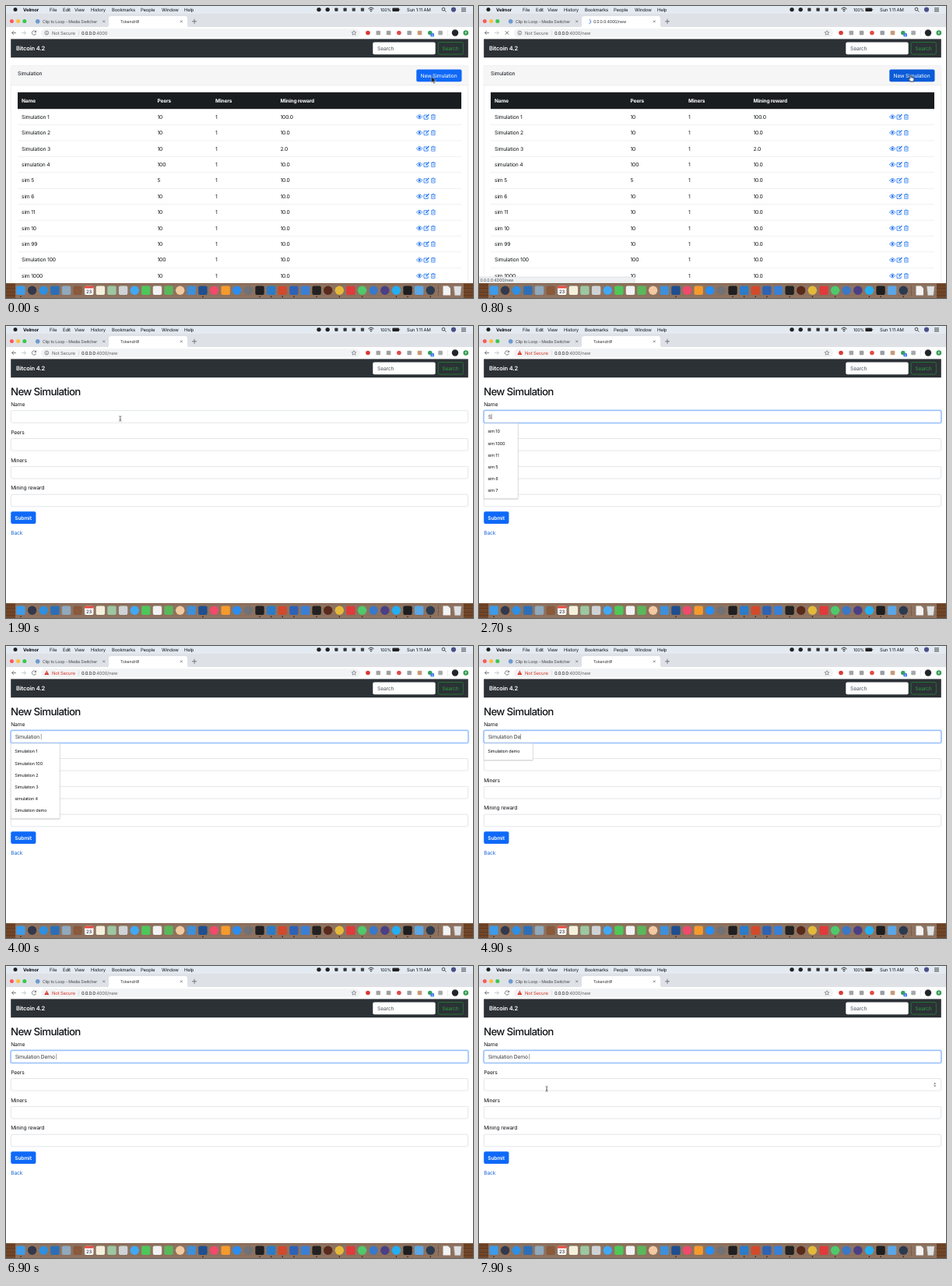
Animation of 600 by 375 pixels, one loop 8 s. Source, as an HTML page:

```html
<!DOCTYPE html>
<html lang="en">
<head>
<meta charset="utf-8">
<title>New simulation</title>
<style>
html, body { margin: 0; width: 100%; height: 100%; overflow: hidden; background: #fff; }
svg { display: block; width: 100vw; height: 100vh; }
text {
  font: 6.7px Inter, "Open Sans", sans-serif; letter-spacing: -.15px; fill: #101316;
  white-space: pre; text-rendering: geometricPrecision;
}
.list, .form, .idle, .load, .tail, .hover, .status, .focus, .spin, .safe, .warn, .red, .arrow, .hand, .beam, .pointer {
  animation: 8s step-end infinite;
}
.list { animation-name: list; }
.form { animation-name: form; }
.idle { animation-name: idle; }
.load { animation-name: load; }
.tail { animation-name: tail; }
.hover { animation-name: hover; }
.status { animation-name: status; }
.focus { animation-name: focus; }
.spin { animation-name: spin; }
.safe { animation-name: safe; }
.warn { animation-name: warn; }
.red { animation-name: red; }
.arrow { animation-name: arrow; }
.hand { animation-name: hand; }
.beam { animation-name: beam; }
.pointer { animation-name: move; animation-timing-function: ease-in-out; }
.turn { transform-origin: 141px 20px; animation: turn 1s linear infinite; }
@keyframes list { 0% { visibility: visible } 13%, 100% { visibility: hidden } }
@keyframes form { 0% { visibility: hidden } 13%, 100% { visibility: visible } }
@keyframes idle { 0% { visibility: visible } 7% { visibility: hidden } 13%, 100% { visibility: visible } }
@keyframes load { 0% { visibility: hidden } 7% { visibility: visible } 13%, 100% { visibility: hidden } }
@keyframes tail { 0% { visibility: hidden } 7%, 100% { visibility: visible } }
@keyframes hover { 0% { fill: #0f69f7 } 4%, 100% { fill: #0b5cd8 } }
@keyframes status { 0% { visibility: hidden } 5% { visibility: visible } 13%, 100% { visibility: hidden } }
@keyframes focus { 0% { visibility: hidden } 27.5%, 100% { visibility: visible } }
@keyframes spin { 0% { visibility: hidden } 95.5%, 100% { visibility: visible } }
@keyframes safe { 0% { visibility: visible } 32.5%, 100% { visibility: hidden } }
@keyframes warn { 0% { visibility: hidden } 32.5%, 100% { visibility: visible } }
@keyframes red { 0% { fill: #5f6368 } 32.5%, 100% { fill: #d93025 } }
@keyframes arrow { 0% { visibility: visible } 4% { visibility: hidden } 13% { visibility: visible } 21%, 100% { visibility: hidden } }
@keyframes hand { 0% { visibility: hidden } 4% { visibility: visible } 13%, 100% { visibility: hidden } }
@keyframes beam { 0% { visibility: hidden } 21% { visibility: visible } 32.5% { visibility: hidden } 91%, 100% { visibility: visible } }
@keyframes move {
  0% { transform: translate(546.5px, 90.5px) }
  6%, 13% { transform: translate(554.5px, 88.5px) }
  22.5%, 91% { transform: translate(146.7px, 119px) }
  98%, 100% { transform: translate(87px, 157.8px) }
}
@keyframes turn { to { transform: rotate(360deg) } }
</style>
</head>
<body>
<svg id="stage" viewBox="0 0 600 375"></svg>
<script>
const rect = (x, y, w, h, fill, more = '') =>
  `<rect x="${x}" y="${y}" width="${w}" height="${h}" fill="${fill}" ${more}/>`;
const dot = (x, y, r, fill, more = '') => `<circle cx="${x}" cy="${y}" r="${r}" fill="${fill}" ${more}/>`;
const line = (d, color, w = .8, more = '') =>
  `<path d="${d}" fill="none" stroke="${color}" stroke-width="${w}" ${more}/>`;
const group = (name, body) => `<g class="${name}">${body}</g>`;
// y is the middle of the capitals
const text = (x, y, s, css = '', size = 6.7, name = '') =>
  `<text x="${x}" y="${y + size * .36}" class="${name}" style="font-size:${size}px;${css}">${s}</text>`;
const cross = (x, y, r, color, w) => line(`M${x - r} ${y - r}l${2 * r} ${2 * r}m0 ${-2 * r}l${-2 * r} ${2 * r}`, color, w);
const shape = (code, x, y, r) => code[0] === 'c'
  ? dot(x, y, r, '#' + code.slice(1))
  : rect(x - r, y - r, 2 * r, 2 * r, '#' + code.slice(1), `rx="${r * .35}"`);

function menuBar() {
  const menus = [[56, 'File'], [73, 'Edit'], [88, 'View'], [109, 'History'], [136, 'Bookmarks'],
    [173, 'People'], [200, 'Window'], [229, 'Help']];
  const marks = ['c222', 'c222', 's333', 's333', 's444', 's444'];
  return rect(0, 0, 600, 9.3, '#e3eaf2') + dot(12, 4.5, 2.5, '#222') +
    text(22, 4.6, 'Velmor', 'font-weight:700', 6) +
    menus.map(([x, s]) => text(x, 4.6, s, '', 5.9)).join('') +
    marks.map((m, i) => shape(m, 402 + i * 11.2, 4.6, m[0] === 'c' ? 2.7 : 2.1)).join('') +
    line('M465.5 3.800q3.5-3.4 7 0M467 5.200q2-2 4 0', '#222', 1) + dot(469, 6.6, .8, '#222') +
    text(481, 4.6, '100%', '', 5.4) +
    rect(496.4, 2.4, 8.6, 4.6, '#222', 'rx="1"') + rect(505.4, 3.8, .8, 1.8, '#222') +
    text(515, 4.6, 'Sun 1:11 AM', '', 5.9) +
    dot(562, 4.1, 1.9, 'none', 'stroke="#222" stroke-width=".8"') + line('M563.4 5.5l2 2', '#222') +
    dot(575, 4.6, 3.1, '#4a4f86') + line('M585 2.800h6m-6 2h6m-6 2h6', '#222');
}

function browser() {
  const grey = '#5f6368';
  const marks = ['cd93a3a', 'sa4a4a4', 'sa0a0a0', 'cdf4b45', 's9aa0a6', 'sc99a78', 'c35a05a', 'sa6a8ab'];
  return rect(0, 9.3, 600, 18.2, '#dee1e6') +
    ['#fc5b57', '#fdbc40', '#34c84a'].map((c, i) => dot(7.4 + i * 8.2, 19.6, 2.5, c)).join('') +
    dot(40.7, 19.8, 2.8, '#6b9bd0') + text(47, 19.8, 'Clip to Loop - Media Switcher', 'fill:#45484c', 5.3) +
    cross(125.7, 19.8, 1.4, grey, .7) +
    '<path d="M129 27.5q3 0 3-3v-8.500q0-3 3-3h95q3 0 3 3v8.500q0 3 3 3z" fill="#fff"/>' +
    group('idle', text(147, 19.8, 'Tokendrill!', 'fill:#303337', 5.3)) +
    group('load', text(147, 19.8, '0.0.0.0:4000/new', 'fill:#303337', 5.3) +
      dot(141, 20, 2.6, 'none', 'class="turn" stroke="#3367d6" stroke-width=".9" stroke-dasharray="7 10"')) +
    cross(225.3, 19.8, 1.4, grey, .7) + line('M239 19.8h6m-3-3v6', grey) +
    rect(0, 27, 600, 15.3, '#fff') +
    line('M13 34.5H7.500m2.500-2.500l-2.500 2.500l2.500 2.500', grey) +
    line('M20 34.5h5.500m-2.500-2.500l2.500 2.500l-2.500 2.500', '#bcbfc3') +
    group('idle', line('M38.300 33a2.700 2.700 0 1 0 .3 2.300m0-3.800v2h-2', grey)) +
    group('load', cross(36, 34.5, 2.2, grey, .9)) +
    rect(45, 29, 410, 11, '#f1f3f4', 'rx="5.5"') +
    group('safe', dot(52.3, 34.5, 2.4, 'none', `stroke="${grey}" stroke-width=".7"`) + line('M52.300 34v2m0-3.200v.6', grey, .7)) +
    group('warn', '<path d="M52.300 31.600l3 5.400h-6z" fill="#d93025"/>' + line('M52.300 33.400v1.600m0 .5v.7', '#fff', .6)) +
    text(59, 34.5, 'Not Secure', '', 5.9, 'red') + rect(93, 31.5, .5, 6, '#c4c7cb') +
    text(97, 34.5, `0.0.0.0<tspan style="fill:${grey}">:4000<tspan class="tail">/new</tspan></tspan>`, '', 5.8) +
    line('M447 31.600l.9 2h2.100l-1.600 1.400l.6 2.200l-2-1.300l-2 1.300l.6-2.200l-1.600-1.400h2.100z', grey, .6) +
    marks.map((m, i) => shape(m, 465 + i * 13.3, 34.5, 2.8)).join('') +
    rect(545.4, 35, 4.6, 4.4, '#3b78e7', 'rx="1"') + text(546.6, 37.3, '2', 'fill:#fff', 3.8) +
    rect(567, 30.5, .5, 8, '#d4d6d9') +
    dot(577, 34.5, 4.2, '#22252a') + dot(590.8, 34.5, 3.3, '#2d9a4b') +
    line('M590.800 36.200v-3m-1.300 1.200l1.300-1.300l1.300 1.300', '#fff', .7);
}

function navBar() {
  return rect(6.2, 42.4, 587.6, 23.8, '#2c3136') + text(13, 54.3, 'Bitcoin 4.2', 'fill:#fff;font-weight:600', 7.5) +
    rect(471.3, 46.4, 80.4, 15.8, '#fff', 'rx="2"') + text(477, 54.4, 'Search', 'fill:#4b5157') +
    rect(555.2, 46.6, 32.2, 15.4, 'none', 'rx="2" stroke="#218a35" stroke-width=".7"') +
    text(560.3, 54.4, 'Search', 'fill:#2a9d3e');
}

function rowIcons(y) {
  const blue = '#1a6ff0';
  return line(`M527.500 ${y}q3.700-5 7.400 0q-3.700 5-7.400 0z`, blue) + dot(531.2, y, 1.4, blue) +
    line(`M541 ${y - 2.2}h-4v5.200h5.200v-2.600`, blue) + line(`M539.400 ${y + .9}l4-4`, blue, 1.3) +
    line(`M546 ${y - 2}h5.800m-4-.1v-.9h2.200v.9m-3.300.1v5.100h4.400v-5.100m-3.100 1.400v2.400m1.800-2.400v2.400`, blue, .65);
}

function listPage() {
  const cols = [20, 194.5, 269, 352.5];
  const rows = [['Simulation 1', 10, '100.0'], ['Simulation 2'], ['Simulation 3', 10, '2.0'], ['simulation 4', 100],
    ['sim 5', 5], ['sim 6'], ['sim 11'], ['sim 10'], ['sim 99'], ['Simulation 100', 100], ['sim 1000']];
  const body = rows.map(([name, peers = 10, reward = '10.0'], i) => {
    const y = 142.3 + i * 20.42;
    return [name, peers, 1, reward].map((s, c) => text(cols[c], y, s)).join('') +
      rowIcons(y) + rect(15, y + 10, 570, .5, '#dee2e6');
  }).join('');
  const heads = ['Name', 'Peers', 'Miners', 'Mining reward'];
  return rect(6.2, 76.4, 587.6, 300, '#fff', 'rx="2" stroke="#dcdcdc" stroke-width=".5"') +
    rect(6.4, 76.6, 587.2, 25, '#f6f6f7') + rect(6, 101.6, 588, .5, '#dcdcdc') +
    text(15, 86.5, 'Simulation') +
    rect(527.3, 81.5, 58.2, 15.8, '#0f69f7', 'rx="2" class="hover"') + text(532.5, 89.5, 'New Simulation', 'fill:#fff') +
    rect(15, 110.8, 570, 21.4, '#1a1d20') +
    heads.map((s, i) => text(cols[i], 121.6, s, 'fill:#fff;font-weight:700', 6.5)).join('') + body +
    group('status', '<path d="M0 348h198q2 0 2 2v6H0z" fill="#eef0f1" stroke="#c9cccf" stroke-width=".5"/>' +
      text(1.5, 352.2, '0.0.0.0:4000/new', 'fill:#4d5156', 5.4));
}

function formPage() {
  const fields = ['Name', 'Peers', 'Miners', 'Mining reward'].map((s, i) => {
    const y = 100.4 + i * 35.85;
    return text(6.2, y, s) + rect(6.3, y + 8.3, 587.4, 15.6, '#fff', 'rx="2" stroke="#ced4da" stroke-width=".6"');
  }).join('');
  return text(6, 84.3, 'New Simulation', 'font-weight:550;letter-spacing:-.65px', 13.3) + fields +
    group('spin', '<path d="M584 151.800l1.700-2.300l1.700 2.300zM584 153.300l1.700 2.300l1.700-2.300z" fill="#8a8d90"/>') +
    rect(6.2, 238.2, 32.2, 15.8, '#0f69f7', 'rx="2"') + text(11.3, 246.2, 'Submit', 'fill:#fff;font-weight:600', 6.6) +
    text(6.2, 266, 'Back', 'fill:#1a66d8');
}

function focusRing() {
  return rect(5.7, 108, 588.6, 16.8, 'none', 'rx="2.4" stroke="#bcd8ff" stroke-width="1.6"') +
    rect(6.3, 108.7, 587.4, 15.6, '#fff', 'rx="2" stroke="#6ea8f7" stroke-width=".7"');
}

function dock() {
  const icons = ('s3d9be9 c34384a c2f8fe0 s2c6fb8 s8fa9bd s8a5a3c sffffff sf5f0dc s9cc7a0 scfd3d6 c3fa9f5 s4fc65a ' +
    'sf2f2f2 s5bb75b cf2c9a0 s3f8fd8 s1f4f8f cf04a6a sf59a2c c2b8df0 c6f7276 s1f1f22 s2b7cc9 sd24a2c s2f62b5 ' +
    's3b7fd4 s222222 c5a2a1c ce4b93a sdf3b3b c4fc96b c3a78c9 c4b3f86 c25aef0 s1d1d1f s5aa6e6 c2b3a4f').split(' ');
  const at = i => 19 + i * 14.62;
  const grain = [358.5, 362, 367, 371].map(y => rect(0, y, 600, .8, '#5a3620')).join('');
  return rect(0, 356, 600, 19, '#714629') + grain + rect(12, 356.5, 576, 19, '#a08c7e', 'opacity=".65"') +
    icons.map((c, i) => shape(c, at(i), 365.3, 5.7)).join('') +
    rect(at(6) - 5.7, 359.6, 11.4, 3, '#e5493f', 'rx="1"') + text(at(6) - 3.6, 367, '23', '', 6) +
    [0, 16, 21, 22, 23, 24, 26, 28, 30, 33, 34, 36].map(i => dot(at(i), 373.2, .8, '#24140b')).join('') +
    rect(555, 359, .5, 13, '#5f422f') +
    '<path d="M561.500 359.500h6.500l3 3v9h-9.500z" fill="#f4f4f4"/>' +
    '<path d="M575.500 360h9.500l-1.200 11.500h-7.100z" fill="#dfe2e4" stroke="#b9bdc1" stroke-width=".5"/>';
}

function pointer() {
  return group('pointer',
    group('arrow', '<path d="M0 0v8l1.900-1.700l1.300 2.900l1.400-.6l-1.300-2.800h2.500z" fill="#111" stroke="#fff" stroke-width=".5"/>') +
    group('hand', '<path d="M-.8.8q.8-1.300 1.600 0v2.400l3 .7q.8.300.6 1.300l-.7 3.300h-4l-2.400-3.300q.2-1.200 1.900-.2z" fill="#fff" stroke="#111" stroke-width=".7"/>') +
    group('beam', line('M-1.500-3.200q1.500 0 1.500.9v4.600q0 .9-1.500.9M1.500-3.200q-1.500 0-1.500.9m0 4.600q0 .9 1.500.9M-.8.800h1.600', '#333', .7)));
}

document.getElementById('stage').innerHTML = rect(0, 0, 600, 375, '#fff') +
  group('list', listPage()) + group('form', formPage()) + group('focus', focusRing()) +
  '<g id="entry"></g>' + menuBar() + browser() + navBar() + dock() + pointer();

const entry = document.getElementById('entry');
const phrase = 'Simulation Demo ';
const past = ['sim 10', 'sim 1000', 'sim 11', 'sim 5', 'sim 6', 'sim 7', 'Simulation 1', 'Simulation 100',
  'Simulation 2', 'Simulation 3', 'simulation 4', 'Simulation demo'];
const keyTime = i => i < 1 ? 2600 : i < 11 ? 2680 + 120 * i : 4500 + 250 * (i - 11);

// Measured large and scaled down, to keep fractions of a pixel
const pen = document.createElement('canvas').getContext('2d');
pen.font = '100px Inter, "Open Sans", sans-serif';
const width = (s, size) => pen.measureText(s).width * size / 100 - .15 * s.length;

function menu(typed) {
  const hits = typed ? past.filter(s => s.toLowerCase().startsWith(typed.toLowerCase())).slice(0, 6) : [];
  if (!hits.length) return '';
  const w = 22 + Math.max(...hits.map(s => width(s, 5.5)));
  const h = hits.length * 15.05 + 6.5;
  return rect(5.8, 125.4, w + .8, h + .8, '#000', 'rx="1.5" opacity=".12"') +
    rect(6.2, 125, w, h, '#fff', 'rx="1" stroke="#c4c6c9" stroke-width=".5"') +
    hits.map((s, i) => text(11.3, 135.5 + i * 15.05, s, '', 5.5)).join('');
}

const start = performance.now();
let shown = '';
function tick() {
  const t = (performance.now() - start) % 8000;
  let n = 0;
  while (n < phrase.length && t >= keyTime(n)) n++;
  const typed = phrase.slice(0, n);
  const since = t - (n ? keyTime(n - 1) : 2200);
  const caret = since >= 0 && since % 1000 < 500;
  const state = n + ' ' + caret;
  if (state !== shown) {
    shown = state;
    entry.innerHTML = text(11.7, 116.4, typed, 'fill:#33383d') +
      (caret ? rect(11.7 + width(typed, 6.7), 112.8, .5, 7.2, '#444') : '') + menu(typed);
  }
  requestAnimationFrame(tick);
}
tick();
</script>
</body>
</html>
```
